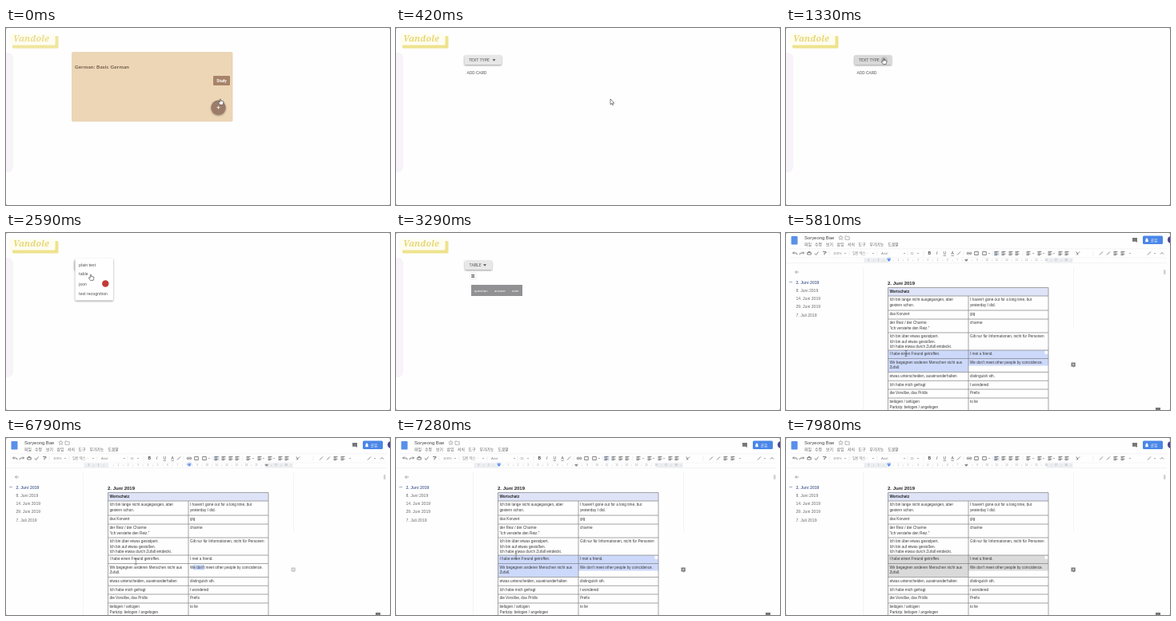
Recreate the animation shown at these times as an HTML page. Size 480 px wide and 222 px high, loop 8 s.

```html
<!DOCTYPE html>
<html lang="en">
<head>
<meta charset="utf-8">
<title>Flashcards from a document</title>
<style>
html, body { margin: 0; width: 100%; height: 100%; overflow: hidden; background: #999; }
svg { display: block; width: 100vw; height: 100vh; }
text { white-space: pre; }
.ui { font-family: Roboto, sans-serif; }
.doc { font-family: "Liberation Sans", Arial, sans-serif; }
.ko { font-family: "Noto Sans CJK KR", "Noto Sans CJK", sans-serif; }
.shade { filter: drop-shadow(0 1px 1.2px #0006); }

#app { animation: app 8s step-end infinite; }
#docs { animation: docs 8s step-end infinite; }
@keyframes app { 0% { opacity: 1 } 62.05%, 100% { opacity: 0 } }
@keyframes docs { 0% { opacity: 0 } 62.05%, 100% { opacity: 1 } }

#logo { animation: logo 8s linear infinite; }
@keyframes logo { 0%, .875% { opacity: .86 } 5.2%, 100% { opacity: 1 } }
#deck { animation: deck 8s linear infinite; }
@keyframes deck { 0%, .875% { opacity: 1 } 3.4%, 100% { opacity: 0 } }
#type { animation: type 8s linear infinite; }
@keyframes type { 0%, 2.6% { opacity: 0 } 5.2%, 33.2% { opacity: 1 } 33.3%, 100% { opacity: 0 } }
#typeBox { animation: hover 8s linear infinite; }
@keyframes hover { 0%, 14.8% { fill: #e7e7e7 } 16.4%, 100% { fill: #d9d9d9 } }
#halo { animation: halo 8s linear infinite; }
@keyframes halo { 0%, 15.6% { opacity: 0 } 16.4%, 100% { opacity: 1 } }
#table { animation: table 8s linear infinite; }
@keyframes table { 0%, 33.2% { opacity: 0 } 35%, 100% { opacity: 1 } }
#menu { transform-origin: 110px 36px; animation: menu 8s infinite; }
@keyframes menu {
  0%, 19.2% { opacity: 0; transform: scale(.75, .56); animation-timing-function: ease-out }
  23.6%, 33.1% { opacity: 1; transform: none }
  36.6%, 100% { opacity: 0; transform: none }
}
#badge { animation: badge 8s step-end infinite; }
@keyframes badge { 0% { opacity: 0 } 32.28% { opacity: 1 } 34%, 100% { opacity: 0 } }

#rows { animation: rows 8s step-end infinite; }
@keyframes rows {
  0% { opacity: 1; fill: #cdd9fb }
  76.05% { opacity: 0; fill: #cdd9fb }
  85.7% { opacity: 1; fill: #cdd9fb }
  98.8%, 100% { opacity: 1; fill: #dadada }
}
#words { animation: words 8s step-end infinite; }
@keyframes words { 0% { opacity: 0 } 83% { opacity: 1 } 85.7%, 100% { opacity: 0 } }
#note { animation: note 8s step-end infinite; }
@keyframes note { 0% { opacity: 1 } 76.05% { opacity: 0 } 83% { opacity: .4 } 85.7%, 100% { opacity: 1 } }
#marks { animation: marks 8s step-end infinite; }
@keyframes marks { 0% { transform: none } 82.2% { transform: translateX(100.5px) } 85.7%, 100% { transform: none } }

#cursor { animation: move 8s infinite; }
@keyframes move {
  0%, 8.7% { transform: translate(268px, 89px); animation-timing-function: ease-in-out }
  16.4%, 19.9% { transform: translate(122px, 38px); animation-timing-function: ease-in-out }
  24.4%, 27% { transform: translate(109px, 67px); animation-timing-function: ease-out }
  28.8%, 39% { transform: translate(106px, 52px); animation-timing-function: ease-in }
  40.6%, 42% { transform: translate(253px, 22px); animation-timing-function: step-end }
  43%, 64.5% { transform: translate(443px, 0); animation-timing-function: ease-in-out }
  72.6%, 76.6% { transform: translate(150px, 151px); animation-timing-function: ease-in-out }
  80.4%, 82.4% { transform: translate(249px, 162px); animation-timing-function: ease-in-out }
  84.8% { transform: translate(163px, 155px); animation-timing-function: ease-out }
  87.4%, 90.6% { transform: translate(150px, 151px); animation-timing-function: ease-in }
  94.4%, 100% { transform: translate(144px, 4px) }
}
#hand { animation: hand 8s step-end infinite; }
#arrow { animation: arrow 8s step-end infinite; }
#beam { animation: beam 8s step-end infinite; }
@keyframes hand { 0% { opacity: 1 } 2.6% { opacity: 0 } 15.6% { opacity: 1 } 33.2%, 100% { opacity: 0 } }
@keyframes arrow {
  0% { opacity: 0 } 2.6% { opacity: 1 } 15.6% { opacity: 0 } 33.2% { opacity: 1 } 41% { opacity: 0 }
  64.65% { opacity: 1 } 67.5% { opacity: 0 } 93.6% { opacity: 1 } 94.4%, 100% { opacity: 0 }
}
@keyframes beam { 0% { opacity: 0 } 72% { opacity: 1 } 93.6%, 100% { opacity: 0 } 67.5% { opacity: 1 } }
</style>
</head>
<body>
<svg viewBox="0 0 480 222" preserveAspectRatio="none">
  <rect width="480" height="222" rx="2" fill="#fefefe"/>

  <g id="app">
    <path d="M0 31h3q6 1 6 8v134q0 7-6 8h-3z" fill="#f7f3f9"/>
    <g id="logo">
      <rect x="8" y="10" width="57.5" height="15.5" rx="1.5" fill="#eee28d"/>
      <rect x="4" y="7" width="57.5" height="14.5" rx="1.5" fill="#fffdf0"/>
      <text x="9" y="17.3" font-family="Noto Serif, serif" font-size="10.8" font-weight="700" font-style="italic" fill="#e6d778">Vandole</text>
    </g>

    <g id="deck" class="ui">
      <rect x="82.5" y="30.5" width="200.5" height="86.5" rx="1" fill="#edd6b6" stroke="#e3cdae" stroke-width=".7"/>
      <text x="86" y="50.6" font-family="Lato, sans-serif" font-size="6.4" font-weight="700" letter-spacing=".16" fill="#6b5a47">German: Basic German</text>
      <rect x="259" y="60" width="21" height="12" rx="1" fill="#a78469"/>
      <text x="269.5" y="67.7" text-anchor="middle" font-size="4.8" font-weight="700" fill="#fff">Study</text>
      <circle class="shade" cx="265.5" cy="99.7" r="9.2" fill="#9c7c69"/>
      <path d="M263.5 99.7h4M265.5 97.7v4" stroke="#fff" stroke-width=".8"/>
    </g>

    <g id="type" class="ui" font-size="5.2" fill="#555">
      <rect id="typeBox" class="shade" x="85.5" y="34" width="46.5" height="12" rx="1.5"/>
      <text x="91" y="41.8">TEXT TYPE</text>
      <circle id="halo" cx="122.5" cy="40.5" r="4.5" fill="#c4c4c4"/>
      <path d="M120.5 39.2h4l-2 2.2z" fill="#444"/>
      <text x="88.5" y="58.2">ADD CARD</text>
    </g>

    <g id="table" class="ui">
      <rect class="shade" x="86" y="34.5" width="34" height="11.5" rx="1.5" fill="#e8e8e8"/>
      <text x="91.5" y="41.9" font-size="5.2" fill="#555">TABLE</text>
      <path d="M109 39.2h4l-2 2.2z" fill="#444"/>
      <rect x="92.5" y="50" width="7.5" height="8" rx="1" fill="#fff" stroke="#e2e2e2" stroke-width=".6"/>
      <path d="M94.2 52.5h4M94.2 54h4M94.2 55.5h4" stroke="#555" stroke-width=".9"/>
      <rect x="94" y="65" width="64" height="14" fill="#919193"/>
      <g font-size="4.3" fill="#fff">
        <text x="98" y="73.6">question</text>
        <text x="123" y="73.6">answer</text>
        <text x="145" y="73.6">note</text>
      </g>
    </g>

    <g id="menu" class="ui" font-size="5.2" fill="#555">
      <rect class="shade" x="86.5" y="32" width="47.5" height="52.5" rx="1" fill="#fff"/>
      <text x="91" y="41.6">plain text</text>
      <text x="91" y="53.4">table</text>
      <text x="91" y="65.7">json</text>
      <text x="91" y="77.6">text recognition</text>
    </g>
    <circle id="badge" cx="124.3" cy="63.5" r="4.2" fill="#c23a35"/>
  </g>

  <g id="docs">
    <path d="M0 3h480v217q0 2-2 2H2q-2 0-2-2z" fill="#fefefe"/>
    <rect x="6.5" y="4" width="8" height="10.5" rx="1" fill="#5a90ea"/>
    <text class="doc" x="23" y="7.9" font-size="5.9" fill="#444">Soryeong Bae</text>
    <g fill="none" stroke="#888" stroke-width=".6">
      <path d="M68.5 3.3l.8 1.7 1.9.2-1.4 1.3.4 1.9-1.7-1-1.7 1 .4-1.9-1.4-1.3 1.9-.2z"/>
      <path d="M74 4h2l.7.8h2.5v3.5h-5.2z"/>
    </g>
    <g id="menus" class="ko" font-size="4.8" fill="#5a5a5a"></g>

    <path d="M433 6h6v6l-1.500-1.300h-4.500z" fill="#777"/>
    <rect x="446" y="3.5" width="25" height="10.5" rx="1.5" fill="#4a86e8"/>
    <path d="M449.5 8.5h3v2.6h-3zM450.1 8.5v-1a.9.9 0 0 1 1.800 0v1" fill="#fff" stroke="#fff" stroke-width=".3"/>
    <text class="ko" x="455.5" y="10.7" font-size="5" fill="#fff">공유</text>
    <circle cx="481.5" cy="8.5" r="4.500" fill="#4a4290"/>

    <path d="M4 19.7H476M4 31H476" stroke="#eeeff1" stroke-width=".6"/>
    <g id="tools" fill="none" stroke="#666" stroke-width=".8">
      <rect x="259.500" y="22" width="7.500" height="7" rx="1" fill="#e6eefc" stroke="none"/>
    </g>
    <g class="doc" font-size="4.2" fill="#888">
      <text x="59" y="27.2">100%</text>
      <text class="ko" x="83" y="27.2">일반 텍스…</text>
      <text x="119" y="27.2">Arial</text>
      <text x="155.5" y="27.2">11</text>
      <g font-size="5" fill="#444">
        <text x="177.500" y="27.3" font-weight="700">B</text>
        <text x="188" y="27.3" font-style="italic">I</text>
        <text x="196.500" y="27.3" text-decoration="underline">U</text>
        <text x="206.500" y="27.3" text-decoration="underline">A</text>
      </g>
    </g>

    <g id="ruler" class="doc" font-size="3" text-anchor="middle" fill="#999">
      <path d="M97.5 31.5h30.500v5.500h-30.500zM325.5 31.5h33v5.500h-33z" fill="#eceef2"/>
      <path d="M0 37.5H476" stroke="#ececec" stroke-width=".6"/>
    </g>
    <g id="marks">
      <path d="M126.500 33h4.500l-2.200 3zM126.500 31.600h4.500v1h-4.500z" fill="#4a86e8"/>
      <path d="M223 33h4.500l-2.200 3z" fill="#888"/>
    </g>

    <path d="M96.500 43v179M359.500 43v75" stroke="#f1f1f1" stroke-width=".8"/>
    <rect x="472" y="46" width="2.500" height="6" rx="1" fill="#d0d0d0"/>
    <rect x="462" y="219" width="6" height="3" fill="#777"/>
    <path d="M16 49h-4.500m2-2-2 2 2 2" fill="none" stroke="#888" stroke-width=".7"/>
    <path d="M4 61.500h4" stroke="#7b8bb5" stroke-width=".7"/>
    <g id="outline" class="doc" font-size="5.1" fill="#6a6a6a"></g>

    <text class="doc" x="127" y="65.2" font-size="6" font-weight="700" fill="#222">2. Juni 2019</text>
    <rect x="127.5" y="68.5" width="200.5" height="10.5" fill="#dfe3f8"/>
    <g id="rows">
      <path d="M127.5 147H328v19.500H228v7.800H127.500z"/>
      <rect x="323.500" y="147.800" width="4" height="4" fill="#fff"/>
    </g>
    <rect id="words" x="234" y="159" width="14" height="6.5" fill="#cbd9fb"/>
    <text class="doc" x="129.5" y="75.2" font-size="4.6" font-weight="700" fill="#222">Wortschatz</text>
    <g id="grid" class="doc" font-size="4.7" fill="#3a3a3a"></g>
    <path d="M127.5 222V68.5H328V222M228 79V222" fill="none" stroke="#808080" stroke-width=".7"/>
    <g id="note">
      <path d="M356.5 162.500h5.200v5h-1.500v1.300l-1.500-1.300h-2.200z" fill="#777"/>
      <path d="M357.700 165h2.800M359.100 163.600v2.800" stroke="#fff" stroke-width=".6"/>
    </g>
  </g>

  <g id="cursor" stroke="#333" stroke-width=".6" stroke-linejoin="round">
    <path id="hand" fill="#fff" d="M-.7.7v3.600l-1.200-.9-.8.7 2.100 3.300h3.700l.8-3.100-.2-1.300-3.100-.6v-1.700a.65.65 0 0 0-1.300 0z"/>
    <path id="arrow" fill="#fff" d="M0 0v7l1.600-1.400 1 2.300 1-.5-1-2.200h2.200z"/>
    <path id="beam" fill="none" stroke="#555" d="M-1.500-3.500h3M-1.500 3.500h3M0-3.500v7"/>
  </g>
</svg>

<script>
const $ = id => document.getElementById(id);
const add = (id, html) => $(id).insertAdjacentHTML("beforeend", html);
const label = (x, y, s, extra = "") => `<text x="${x}" y="${y}" ${extra}>${s}</text>`;

const menus = { 파일: 23, 수정: 36, 보기: 50, 삽입: 63.5, 서식: 77, 도구: 90.5, 부가기능: 104.5, 도움말: 127.5 };
for (const name in menus) add("menus", label(menus[name], 15.8, name));

["2. Juni", "8. Juni", "14. Juni", "29. Juni", "7. Juli"].forEach((day, i) =>
  add("outline", label(12.5, 63.6 + i * 10.25, day + " 2019", i ? "" : 'fill="#5f70a0" font-weight="700"')));

// Centimetre ruler
for (let k = -2; k <= 18; k++) {
  const x = 128 + k * 12.33;
  if (k) add("ruler", label(x, 35.4, Math.abs(k)));
  add("ruler", `<path d="M${x + 6.2} 33.6v1.6" stroke="#bbb" stroke-width=".5"/>`);
}

// Toolbar
const icon = (x, d) => add("tools", `<path d="M${x} 25.5${d}"/>`);
const bars = "m-2.5-2h5m-5 1.4h3.5m-3.5 1.4h5m-5 1.4h3.5";
const box = "m-2.3-2h4.6v4h-4.6z";
const slash = "m-2 2 4-4";
icon(11, "m-2.5-.5h3.5q2 0 2 2.3m-4-3.8-1.5 1.5 1.5 1.5");
icon(20, "m2.5-.5h-3.5q-2 0-2 2.3m4-3.8 1.5 1.5-1.5 1.5");
icon(29, "m-2.3-1h4.6v2.5h-4.6zm1-1h2.6");
icon(38, "m-2 0 1.5 2 3-4");
icon(48, "m-2-2h4v1.5h-2v2.5");
icon(229, "m-.5-1.3h-1a1.3 1.3 0 0 0 0 2.6h1m1-2.6h1a1.3 1.3 0 0 1 0 2.6h-1m-2-1.3h3");
icon(365, "m-2 2 4-4m-4 0 2 4");
icon(470, "m-2 1 2-2 2 2");
[216, 394, 403, 454].forEach(x => icon(x, slash));
[238, 248].forEach(x => icon(x, box));
[263, 272, 281, 289, 303, 317, 330, 343, 351, 412, 421].forEach(x => icon(x, bars));
[74, 109, 148, 165, 254, 309, 322, 335, 430, 461].forEach(x =>
  add("tools", `<path d="M${x - 1} 25h2l-1 1.2z" fill="#777" stroke="none"/>`));
[54, 79, 114, 152, 172, 222, 258, 296, 384].forEach(x =>
  add("tools", `<path d="M${x} 22.5v6" stroke="#e4e4e4" stroke-width=".6"/>`));

// Vocabulary rows: top edge, left lines, right lines
const rows = [
  [79, "Ich bin lange nicht ausgegangen, aber|gestern schon.", "I haven't gone out for a long time, but|yesterday I did."],
  [97, "das Konzert", "gig"],
  [108, "der Reiz / der Charme|“Ich verstehe den Reiz.”", "charme"],
  [125, "Ich bin über etwas gestolpert.|Ich bin auf etwas gestoßen.|Ich habe etwas durch Zufall entdeckt.", "Gilt nur für Informationen, nicht für Personen"],
  [147, "I habe einen Freund getroffen.", "I met a friend."],
  [157.5, "Wir begegnen anderen Menschen nicht aus|Zufall.", "We don't meet other people by coincidence."],
  [174.5, "etwas unterscheiden, auseinanderhalten", "distinguish sth."],
  [185.3, "Ich habe mich gefragt", "I wondered"],
  [196, "die Vorsilbe, das Präfix", "Prefix"],
  [207, "belügen / anlügen|Partizip: belogen / angelogen", "to lie"]
];
for (const [top, left, right] of rows) {
  add("grid", `<path d="M127.5 ${top}H328" stroke="#808080" stroke-width=".7"/>`);
  [[129.5, left], [230, right]].forEach(([x, cell]) =>
    cell.split("|").forEach((line, i) => add("grid", label(x, top + 6.4 + i * 6.1, line))));
}
</script>
</body>
</html>
```
